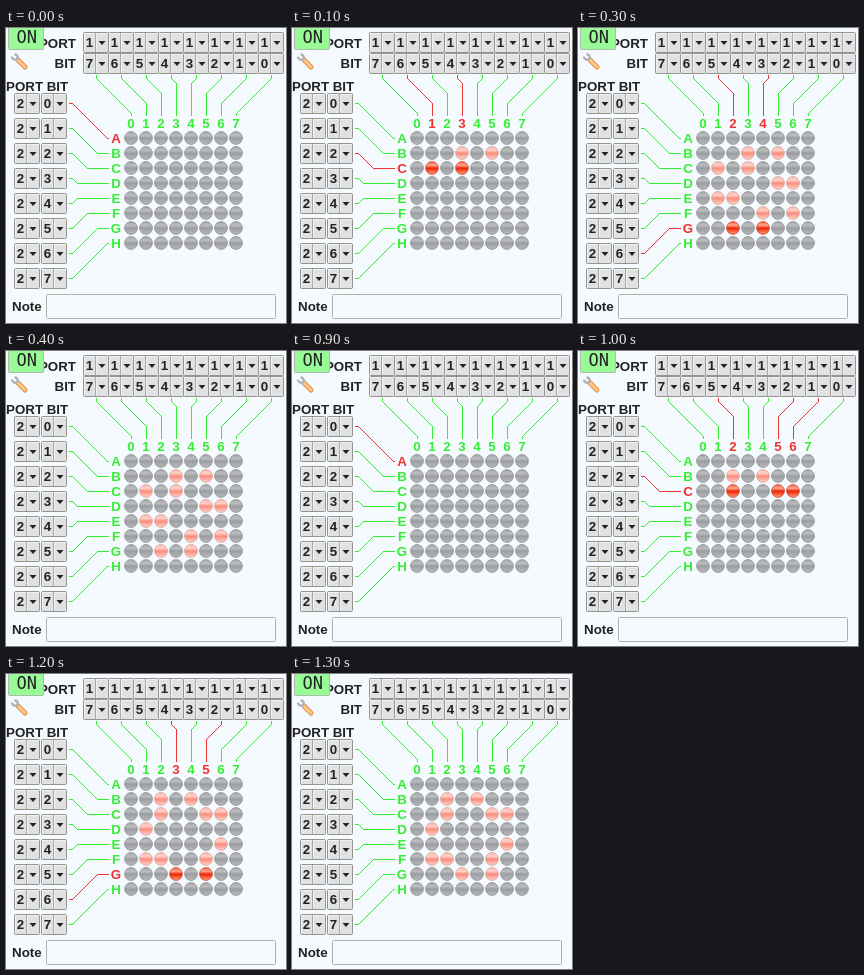
Recreate the animation shown at these times as an HTML page. Size 280 by 295 pixels, loop 1.8 s.

```html
<!DOCTYPE html>
<html lang="en">
<head>
<meta charset="utf-8">
<title>LED matrix</title>
<style>
html, body { margin: 0; width: 100%; height: 100%; overflow: hidden; background: #f5faff; }
svg { display: block; width: 280px; height: 295px; }
text { font: bold 13.33px "Liberation Sans", Arial, sans-serif; fill: #222; }
.mid { text-anchor: middle; }
.label { fill: #33ee33; }
.label.on { fill: #ee3333; }
.wire { fill: none; stroke: #33ee33; shape-rendering: crispEdges; }
.wire.on { stroke: #ee3333; }
.led { fill: url(#off); stroke: #8e9092; stroke-width: .8; }
.led.pale { fill: url(#pale); stroke: #d8a39b; }
.led.lit { fill: url(#lit); stroke: #cc4a30; }
.box { fill: #e0e1e2; stroke: #97948e; }
.edge { fill: none; stroke: #f2f2f2; }
</style>
</head>
<body>
<svg id="stage" viewBox="0 0 280 295">
  <defs>
    <linearGradient id="off" x2="0" y2="1">
      <stop offset="0" stop-color="#a2a4a6"/><stop offset=".28" stop-color="#bcbec0"/>
      <stop offset=".52" stop-color="#9b9da0"/><stop offset="1" stop-color="#b8babc"/>
    </linearGradient>
    <linearGradient id="pale" x2="0" y2="1">
      <stop offset="0" stop-color="#ffb8ac"/><stop offset=".28" stop-color="#ffd2ca"/>
      <stop offset=".52" stop-color="#fa8c7c"/><stop offset="1" stop-color="#ffd4ca"/>
    </linearGradient>
    <linearGradient id="lit" x2="0" y2="1">
      <stop offset="0" stop-color="#ff6040"/><stop offset=".28" stop-color="#ffa890"/>
      <stop offset=".52" stop-color="#ee2408"/><stop offset="1" stop-color="#ffa078"/>
    </linearGradient>
  </defs>
  <text x="70" y="20" text-anchor="end">PORT</text>
  <text x="70" y="40" text-anchor="end">BIT</text>
  <rect x="2.5" y="-3.5" width="35" height="25" rx="1" fill="#98fb98" stroke="#a8bca8"/>
  <text x="10.500" y="15" style="font:17px 'DejaVu Sans Mono',monospace">ON</text>
  <g fill="none" stroke-linecap="round">
    <path d="M12 32L19 39" stroke="#dc9048" stroke-width="5"/>
    <path d="M12 32L19 39" stroke="#ffc888" stroke-width="3"/>
    <path d="M6 29.500Q8 33 11 31Q13 28 9.500 26.500" stroke="#b0b3b6" stroke-width="2.500"/>
  </g>
  <text x="0" y="63">PORT BIT</text>
  <text x="6" y="283">Note</text>
  <rect x="40.500" y="266.500" width="229" height="24" rx="1" fill="#f5faff" stroke="#b3b0a8"/>
</svg>
<script>
const stage = document.getElementById("stage");
const STEP = 50, HALF = 900, N = 8, STUB = 4;
// Lit columns for rows A to H, one list per picture
const pictures = [
  ["", "35", "13", "56", "12", "46", "24", ""],
  ["", "24", "256", "1", "6", "125", "35", ""]
];

function add(tag, attrs, content = "") {
  const el = document.createElementNS("http://www.w3.org/2000/svg", tag);
  for (const key in attrs) el.setAttribute(key, attrs[key]);
  el.textContent = content;
  return stage.appendChild(el);
}

function picker(x, y, value) {
  add("rect", { class: "box", x: x + .5, y: y + .5, width: 25, height: 20, rx: 1 });
  add("path", { class: "edge", d: `M${x + 1.5} ${y + 19}v-17.5h10` });
  add("path", { d: `M${x + 12.5} ${y + 1}v19`, stroke: "#aaa8a4" });
  add("path", { class: "edge", d: `M${x + 13.5} ${y + 19}v-17.5h11` });
  add("path", { d: `M${x + 15.5} ${y + 9}h7l-3.5 4z`, fill: "#222" });
  add("text", { class: "mid", x: x + 6.5, y: y + 15 }, value);
}

// Short stub, 45 degree slope, then straight to the label
function wire(from, to, start, end, vertical) {
  const bend = start + STUB;
  const points = [[start, from], [bend, from], [bend + Math.abs(to - from), to], [end, to]];
  const d = points.map(([along, across]) =>
    vertical ? `${across + .5} ${along + .5}` : `${along + .5} ${across + .5}`);
  return add("path", { class: "wire", d: "M" + d.join("L") });
}

const cols = [], rows = [], leds = [];
for (let i = 0; i < N; i++) {
  const x = 125 + 15 * i, y = 110 + 15 * i;
  picker(77 + 25 * i, 4, 1);
  picker(77 + 25 * i, 25, 7 - i);
  picker(8, 65 + 25 * i, 2);
  picker(35, 65 + 25 * i, i);
  cols.push([
    wire(90 + 25 * i, x, 46, 87, true),
    add("text", { class: "label mid", x, y: 100 }, i)
  ]);
  rows.push([
    wire(75 + 25 * i, y, 62, 102, false),
    add("text", { class: "label mid", x: 110, y: y + 5 }, "ABCDEFGH"[i])
  ]);
}
for (let r = 0; r < N; r++) {
  leds.push(Array.from({ length: N }, (_, c) =>
    add("circle", { class: "led", cx: 125 + 15 * c, cy: 110 + 15 * r, r: 6.4 })));
}

const mark = (parts, on) => parts.forEach(p => p.classList.toggle("on", on));

let shown = -1;
function draw(now) {
  const t = now % (2 * HALF);
  const half = Math.floor(t / HALF);
  const active = Math.min(N, Math.floor((t % HALF) / STEP));
  const key = half * (N + 1) + active;
  if (key === shown) return;
  shown = key;
  const picture = pictures[half];
  for (let r = 0; r < N; r++) {
    mark(rows[r], r === active);
    mark(cols[r], active < N && picture[active].includes(r));
    leds[r].forEach((led, c) => {
      const set = picture[r].includes(c);
      led.classList.toggle("pale", set && r < active);
      led.classList.toggle("lit", set && r === active);
    });
  }
}

function tick() {
  draw(performance.now());
  requestAnimationFrame(tick);
}
tick();
</script>
</body>
</html>
```
